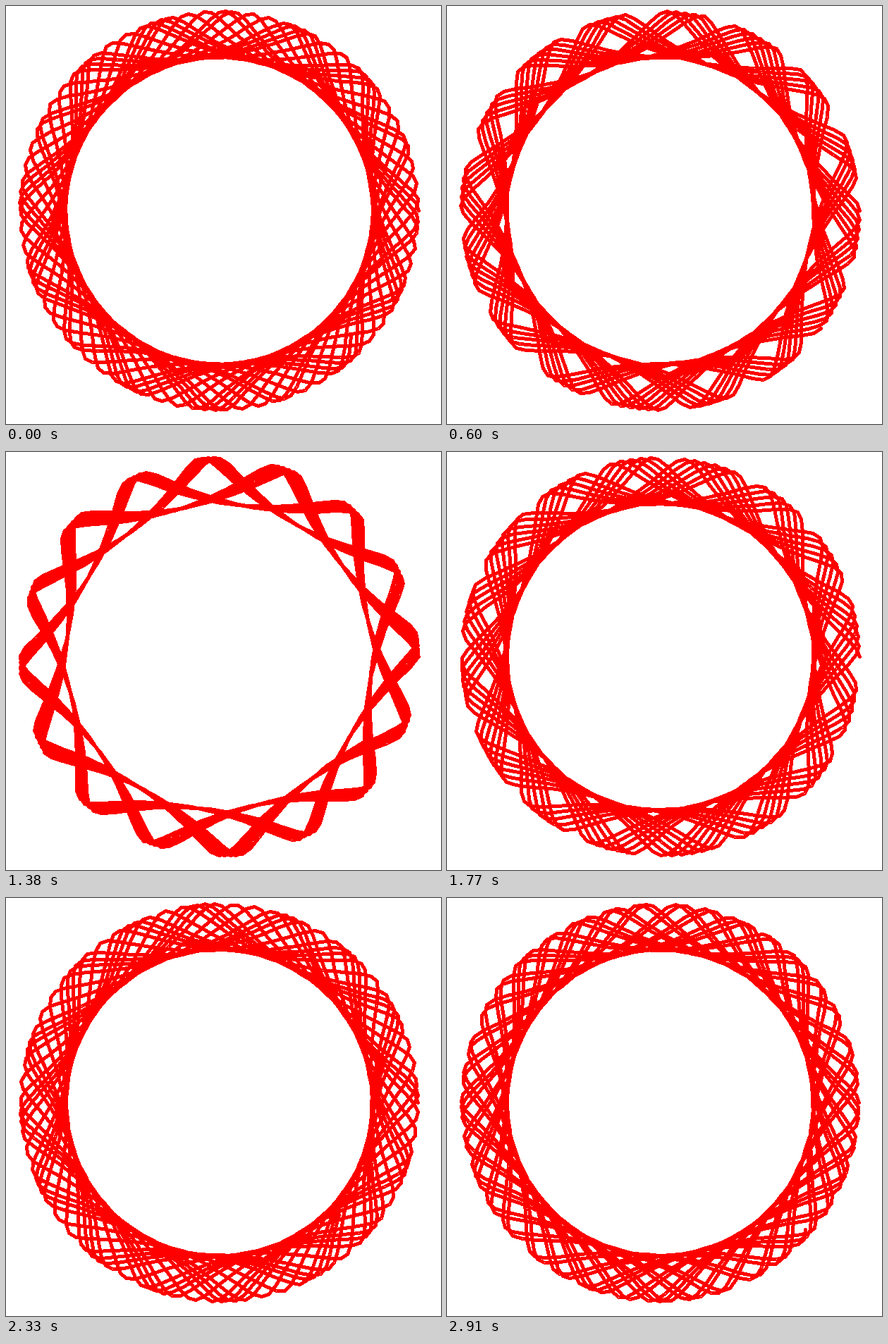
Write an HTML page that moves like this. It is 617x593 px and loops after 3.01 s.

```html
<!DOCTYPE html>
<html lang="en">
<head>
<meta charset="utf-8">
<title>Spirograph</title>
<style>
  html, body { margin: 0; width: 100%; height: 100%; overflow: hidden; background: #fff; }
  svg { display: block; }
  path { fill: none; stroke: #f00; stroke-width: 5; stroke-linecap: round; stroke-linejoin: round; }
</style>
</head>
<body>
<svg width="617" height="593" viewBox="0 0 617 593" shape-rendering="crispEdges">
  <path id="curve"/>
</svg>
<script>
  const curve = document.getElementById('curve');
  const cx = 302, cy = 290;
  const ring = 307.3, pen = 33, points = 1000;

  // How long each pose stays, in hundredths of a second.
  const holds = [
    13, 10, 9, 9, 10, 9,
    12, 9, 9, 8, 10, 10,
    8, 12, 7, 11, 11, 10,
    7, 10, 10, 10, 9, 10,
    8, 10, 10, 10, 10, 10, 10
  ];
  const loop = 10 * holds.reduce((sum, h) => sum + h, 0);

  // Snap to the middle of a pixel.
  const snap = v => Math.round(v) + 0.5;

  // Hypotrochoid sampled every 0.1 rad, y pointing up.
  function trochoid(wheel) {
    const arm = ring - wheel, ratio = arm / wheel;
    const pts = [];
    for (let i = 0; i < points; i++) {
      const t = i / 10;
      const x = arm * Math.cos(t) + pen * Math.cos(ratio * t);
      const y = arm * Math.sin(t) - pen * Math.sin(ratio * t);
      pts.push(snap(cx + x) + ' ' + snap(cy - y));
    }
    return 'M' + pts.join('L');
  }

  const poses = holds.map((_, i) => trochoid(57.33 + 0.025 * i));

  function poseAt(ms) {
    let i = 0, end = holds[0] * 10;
    while (ms >= end && i < holds.length - 1) end += holds[++i] * 10;
    return i;
  }

  let shown = -1;
  function draw() {
    const i = poseAt(performance.now() % loop);
    if (i !== shown) curve.setAttribute('d', poses[shown = i]);
    requestAnimationFrame(draw);
  }
  draw();
</script>
</body>
</html>
```
